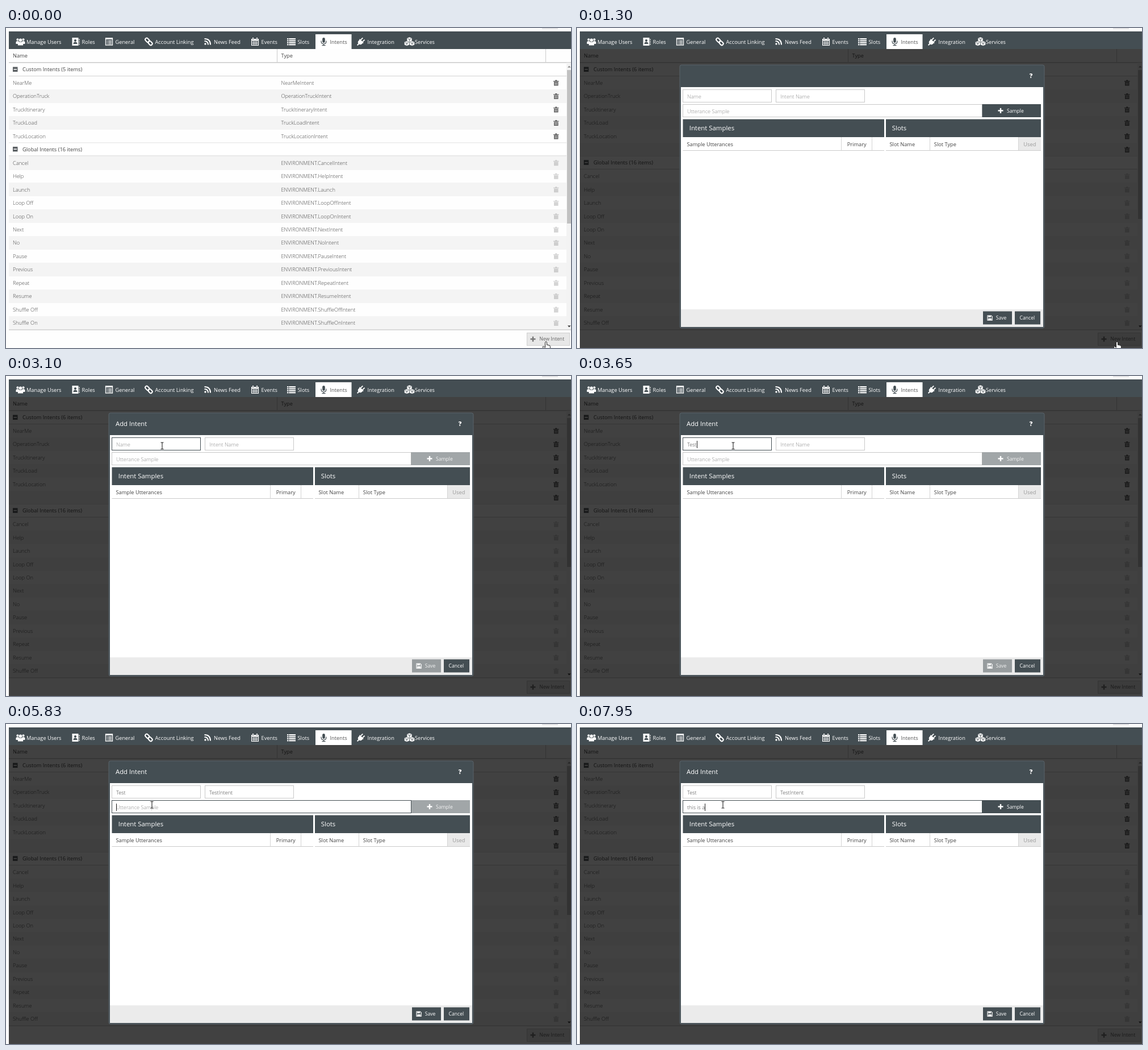
These frames come from a looping animation (995 px wide and 563 px high, 8 s). An HTML page with a canvas:

```html
<!DOCTYPE html>
<html lang="en">
<head>
<meta charset="utf-8">
<title>Add intent</title>
<style>
html, body { margin: 0; width: 100%; height: 100%; overflow: hidden; background: #fdfdfd; }
canvas { display: block; width: 995px; height: 563px; }
</style>
</head>
<body>
<canvas id="stage" width="995" height="563"></canvas>
<script>
const g = document.getElementById('stage').getContext('2d');
const LOOP = 8000, DARK = '#444e53', LINE = '#cbcbcb', SIZE = 9.25;
const PITCH = 23.46, TOP = 96.6;

const custom = ['NearMe', 'OperationTruck', 'TruckItinerary', 'TruckLoad', 'TruckLocation'];
const globals = ['Cancel', 'Help', 'Launch', 'Loop Off', 'Loop On', 'Next', 'No', 'Pause',
  'Previous', 'Repeat', 'Resume', 'Shuffle Off', 'Shuffle On'];

function rect(x, y, w, h, color) {
  g.fillStyle = color;
  g.fillRect(x, y, w, h);
}

function frame(x, y, w, h, color) {
  g.strokeStyle = color;
  g.lineWidth = 1;
  g.strokeRect(x + .5, y + .5, w - 1, h - 1);
}

// y is the middle of the capital letters
function text(s, x, y, color = '#444', size = SIZE, weight = 400) {
  g.font = `${weight} ${size}px "Open Sans", sans-serif`;
  g.fillStyle = color;
  g.fillText(s, x, y + size * .357);
  return g.measureText(s).width;
}

function at(x, y, draw) {
  g.save();
  g.translate(x, y);
  draw();
  g.restore();
}

function fill(d, color) {
  g.fillStyle = color;
  g.fill(new Path2D(d), 'evenodd');
}

function stroke(d, color, width) {
  g.strokeStyle = color;
  g.lineWidth = width;
  g.stroke(new Path2D(d));
}

function disc(x, y, r, color) {
  g.fillStyle = color;
  g.beginPath();
  g.arc(x, y, r, 0, 7);
  g.fill();
}

function plus(x, y, color) {
  rect(x - 4.5, y - 1.2, 9, 2.4, color);
  rect(x - 1.2, y - 4.5, 2.4, 9, color);
}

function trash(y, alpha) {
  g.globalAlpha = alpha;
  at(964, y - 5, () => {
    fill('M0 1.5H3L3.5 0H6L6.5 1.5H9.5V2.8H0Z M1 3.4H8.5V10H1Z', '#555');
    for (const x of [2.5, 4.3, 6.1]) rect(x, 4.4, .8, 4.4, '#e8e8e8');
  });
  g.globalAlpha = 1;
}

// Icons are centred on the origin
const W = '#fff';
const icons = {
  users() {
    for (const s of [-1, 1]) {
      disc(s * 5, -3.6, 2.1, W);
      at(s * 5, 0, () => fill('M-3 4V1Q-3-1 0-1T3 1V4Z', W));
    }
    disc(0, -2.6, 3.4, DARK);
    disc(0, -2.8, 2.8, W);
    fill('M-4.6 6.6V3Q-4.4 .4 0 .4T4.6 3V6.6Z', W);
  },
  roles() {
    fill('M-6-7H5V7H-6Z M6-5H7V-2H6Z M6-1H7V2H6Z M6 3H7V6H6Z', W);
    disc(-.5, -2, 2.1, DARK);
    fill('M-4 4Q-4 .5-.5 .5T3 4Z', DARK);
  },
  form() {
    stroke('M-6-6.2H6V6.2H-6Z', W, 1.3);
    rect(-6, -6.5, 12, 2.6, W);
    for (const y of [-2, .6, 3.2]) {
      rect(-4, y, 1.5, 1.3, W);
      rect(-1.5, y, 6, 1.3, W);
    }
  },
  link() {
    g.rotate(Math.PI / 4);
    for (const x of [-7.8, -.4]) {
      g.beginPath();
      g.roundRect(x, -2.6, 8, 5.2, 2.5);
      g.strokeStyle = W;
      g.lineWidth = 2;
      g.stroke();
    }
  },
  feed() {
    disc(-4, 4, 1.7, W);
    stroke('M-5.5-1Q1-1 1 5.5 M-5.5-5Q5-5 5 5.5', W, 2);
  },
  calendar() {
    fill('M-6.5-5H6.5V7H-6.5Z M-5.3-1.5V5.8H5.3V-1.5Z M-4.5-7H-2.5V-4H-4.5Z M2.5-7H4.5V-4H2.5Z', W);
    stroke('M-5 1H5 M-5 3.4H5 M-1.8-1.5V6 M1.8-1.5V6', W, .9);
  },
  list() {
    for (const y of [-6, -2.6, .8, 4.2]) {
      rect(-7.5, y, 2.4, 2.2, W);
      rect(-4.2, y, 11.7, 2.2, W);
    }
  },
  mic() {
    g.beginPath();
    g.roundRect(-2.3, -7, 4.6, 9, 2.3);
    g.fillStyle = DARK;
    g.fill();
    stroke('M-4.4-1.5V0Q-4.2 4 0 4T4.4 0V-1.5 M0 4V6.8 M-3 6.7H3', DARK, 1.2);
  },
  plug() {
    g.rotate(Math.PI / 4);
    fill('M-4.8-2H4.8V-.5H4V1.5Q4 5 1 5.4V9H-1V5.4Q-4 5-4 1.5V-.5H-4.8Z M-3.2-7H-1.4V-2H-3.2Z M1.4-7H3.2V-2H1.4Z', W);
  },
  cubes() {
    for (const [x, y] of [[0, -3.7], [-4.6, 3.2], [4.6, 3.2]]) at(x, y, () => {
      fill('M0-4L4.2-2.4V2.4L0 4L-4.2 2.4V-2.4Z', W);
      stroke('M-3-1.6L0-.4L3-1.6 M0-.4V3', DARK, .9);
    });
  }
};

const tabs = [
  ['users', 25.5, 'Manage Users', 36], ['roles', 122.5, 'Roles', 133.5],
  ['form', 181.5, 'General', 192.5], ['link', 251.5, 'Account Linking', 262.5],
  ['feed', 355, 'News Feed', 366], ['calendar', 438.5, 'Events', 449.5],
  ['list', 502.5, 'Slots', 513.5], ['mic', 559.5, 'Intents', 570.5],
  ['plug', 625, 'Integration', 636.5], ['cubes', 710.5, 'Services', 720]
];

function nav() {
  rect(944, 0, 28, 2, '#e4e4e6');
  rect(5, 6, 990, 31, DARK);
  rect(545, 11, 63.5, 26, '#fff');
  for (const [icon, ix, label, x] of tabs) {
    at(ix, 24, icons[icon]);
    text(label, x, 24.3, icon === 'mic' ? '#555' : W);
  }
}

function group(label, y) {
  rect(5, y - 12, 982, 24, '#fff');
  rect(5, y - 12, 982, 1, '#e2e2e2');
  rect(5, y + 11, 982, 1, '#d2d2d2');
  rect(12, y - 4.5, 8.5, 8.5, '#5a5f62');
  rect(13.5, y - 1, 5.5, 1.5, W);
  text(label, 29, y);
}

function row(name, type, k, slot, alpha) {
  const y = TOP + PITCH * slot;
  if (k % 2) rect(5, Math.round(y - 11.8), 982, 24, '#f4f4f4');
  text(name, 12, y, '#444', SIZE, 300);
  text(type, 484.5, y, '#444', SIZE, 300);
  trash(y, alpha);
}

function table(extra, pressed) {
  rect(5, 37, 990, 526, '#fefefe');
  g.save();
  g.beginPath();
  g.rect(5, 61, 990, 470);
  g.clip();
  const names = extra ? [...custom, ''] : custom, n = names.length;
  names.forEach((s, i) => row(s, s && s + 'Intent', i, i, .95));
  globals.forEach((s, i) => {
    const suffix = s === 'Launch' ? '' : 'Intent';
    row(s, 'ENVIRONMENT.' + s.replace(' ', '') + suffix, n + i, n + 1 + i, .25);
  });
  group(`Custom Intents (${n} items)`, 73);
  group('Global Intents (16 items)', TOP + PITCH * n - .5);
  g.restore();

  text('Name', 12, 49);
  text('Type', 484.5, 49);
  rect(5, 60, 990, 1, LINE);
  rect(477, 37, 1, 24, LINE);
  rect(950, 37, 1, 24, LINE);

  rect(987, 61, 8, 470, '#f3f3f3');
  rect(988, 74, 7, extra ? 262 : 270, '#c1c1c1');
  fill('M989 69.5L991.8 66.5L994.6 69.5Z', '#888');
  fill('M989 523.5L991.8 526.5L994.6 523.5Z', '#333');
  rect(5, 530.5, 990, 1, '#bdbdbd');

  rect(917, 536, 76, 23, pressed ? '#dcdcdc' : '#e8e8e8');
  frame(917, 536, 76, 23, '#cfcfcf');
  plus(928, 547.3, '#777');
  text('New Intent', 939.3, 547.3, '#666', 8.6);
}

function field(x, y, w, value, hint, focus, caret) {
  rect(x, y, w, 23, W);
  frame(x, y, w, 23, focus ? DARK : '#c9c9c9');
  const ty = y + 12.3;
  const tw = text(value || hint, x + 8, ty, value ? '#444' : '#888', SIZE, 300);
  if (caret) rect(Math.round(x + 8 + (value ? tw : 0)), y + 6, 1, 13, '#222');
}

function button(x, y, w, label, tx, on, icon) {
  g.globalAlpha = on ? 1 : .5;
  rect(x, y, w, 23, DARK);
  g.globalAlpha = 1;
  text(label, tx, y + 11.5, on ? W : '#f2f2f2', 8.6);
  if (icon) icon();
}

function modal(s) {
  g.fillStyle = DARK;
  g.beginPath();
  g.roundRect(181, 65, 642, 463, 3);
  g.fill();
  g.strokeStyle = '#59636a';
  g.lineWidth = 1;
  g.stroke();
  rect(183, 104, 638, 391, W);
  rect(183, 495, 638, 31, '#ebebeb');
  if (s.ready) text('Add Intent', 193, 84.3, W, 11.3);
  text('?', 796.8, 84.5, W, 11, 800);

  field(186, 108, 157, s.name, 'Name', s.focus === 1, s.focus === 1 && s.caret);
  field(350, 108, 157, s.intent, 'Intent Name');
  field(186, 134, 528, s.sample, 'Utterance Sample', s.focus === 2, s.focus === 2 && s.caret);
  button(713.5, 134, 103.5, 'Sample', 757, s.canAdd, () => plus(746, 145.4, W));

  rect(186.5, 160.5, 354.5, 31.5, DARK);
  rect(544, 160.5, 273, 31.5, DARK);
  text('Intent Samples', 197.7, 176.2, W, 11.4);
  text('Slots', 554.8, 176.2, W, 11.4);
  rect(778, 192, 39, 23, '#e9e9e9');
  rect(186.5, 215, 354.5, 1, LINE);
  rect(544, 215, 273, 1, LINE);
  for (const x of [465, 519, 621, 777]) rect(x, 192, 1, 23, '#d4d4d4');
  text('Sample Utterances', 193.5, 204.2);
  text('Primary', 475.7, 204.2);
  text('Slot Name', 550.5, 204.2);
  text('Slot Type', 628.8, 204.2);
  text('Used', 786.3, 204.2, '#999');

  button(715, 498.5, 51, 'Save', 737.7, s.canSave, () => at(727, 510, () => {
    stroke('M-4-4H2.5L4.2-2.3V4.2H-4Z', W, 1.2);
    fill('M-2.6-4H1.8V-1H-2.6Z M-2.6 .8H2.8V4H-2.6Z', W);
  }));
  button(771, 498.5, 45, 'Cancel', 779.6, true);
}

function pointer(kind, x, y) {
  at(x, y, () => {
    if (kind === 'beam') {
      stroke('M-2.5-5.5H-.7L0-5L.7-5.5H2.5 M0-5V5.5 M-2.5 6H-.7L0 5.5L.7 6H2.5', '#222', 1.1);
      return;
    }
    const d = kind === 'hand'
      ? 'M-1.5 1Q-1.5-.6 0-.6T1.5 1V5L5 5.6Q7.4 6 7.4 8V11L6 15H-1.5L-5.5 9.5Q-6.5 7.5-4.5 7.6L-1.5 9.6Z'
      : 'M0 0V13L3 10.2L5 14.5L7 13.6L5 9.4H9Z';
    fill(d, W);
    stroke(d, '#222', 1);
  });
}

function ring(x, y) {
  disc(x, y, 7.5, 'rgba(235,235,235,.6)');
  g.strokeStyle = '#333';
  g.lineWidth = 1.1;
  g.stroke();
}

// Position held in n equal steps between two points
function glide(t, t0, t1, n, [x0, y0], [x1, y1]) {
  const p = Math.min(1, Math.max(0, Math.floor((t - t0) / (t1 - t0) * n + .03) / n));
  const e = p * p * (3 - 2 * p);
  return [x0 + (x1 - x0) * e, y0 + (y1 - y0) * e];
}

// Number of key moments already passed
const passed = (t, ...times) => times.filter(v => t >= v).length;

function state(t) {
  const typed = passed(t, 6010, 6190, 6380, 6930, 7460, 7620, 7790, 7950);
  const nameKeys = passed(t, 3280, 3460, 3650);
  return {
    ready: t >= 1480,
    focus: t >= 4730 ? 2 : t >= 2540 ? 1 : 0,
    caret: passed(t, 2540, 3100, 3280, 4190, 4730, 5270, 5830) % 2 === 1,
    name: nameKeys ? 'Test'.slice(0, nameKeys + 1) : '',
    intent: t >= 3830 ? 'TestIntent' : '',
    sample: typed ? 'this is a'.slice(0, typed + 1) : '',
    canSave: t < 1480 || t >= 4010,
    canAdd: t < 1480 || t >= 6930
  };
}

function draw(t) {
  const open = t >= 1300, press = t >= 1120 && !open;
  const start = [951, 552.5], rest = [362.5, 137.5], name = [275, 122.5], sample = [257, 142];
  rect(0, 0, 995, 563, '#fdfdfd');
  table(open, press);
  if (open) rect(5, 37, 990, 526, 'rgba(0,0,0,.74)');
  nav();
  if (open) modal(state(t));
  if (press) ring(951.5, 552.5);
  if (t >= 4730 && t < 4900) ring(...sample);

  if (t < 1480) pointer('hand', ...start);
  else if (t < 1990) pointer('arrow', ...glide(t, 1300, 1990, 4, start, rest));
  else if (t < 4190) pointer('beam', ...glide(t, 1990, 2360, 2, rest, name));
  else pointer('beam', ...glide(t, 4190, 4730, 3, name, sample));
}

const begin = performance.now();
function tick() {
  draw((performance.now() - begin) % LOOP);
  requestAnimationFrame(tick);
}
tick();
</script>
</body>
</html>
```
